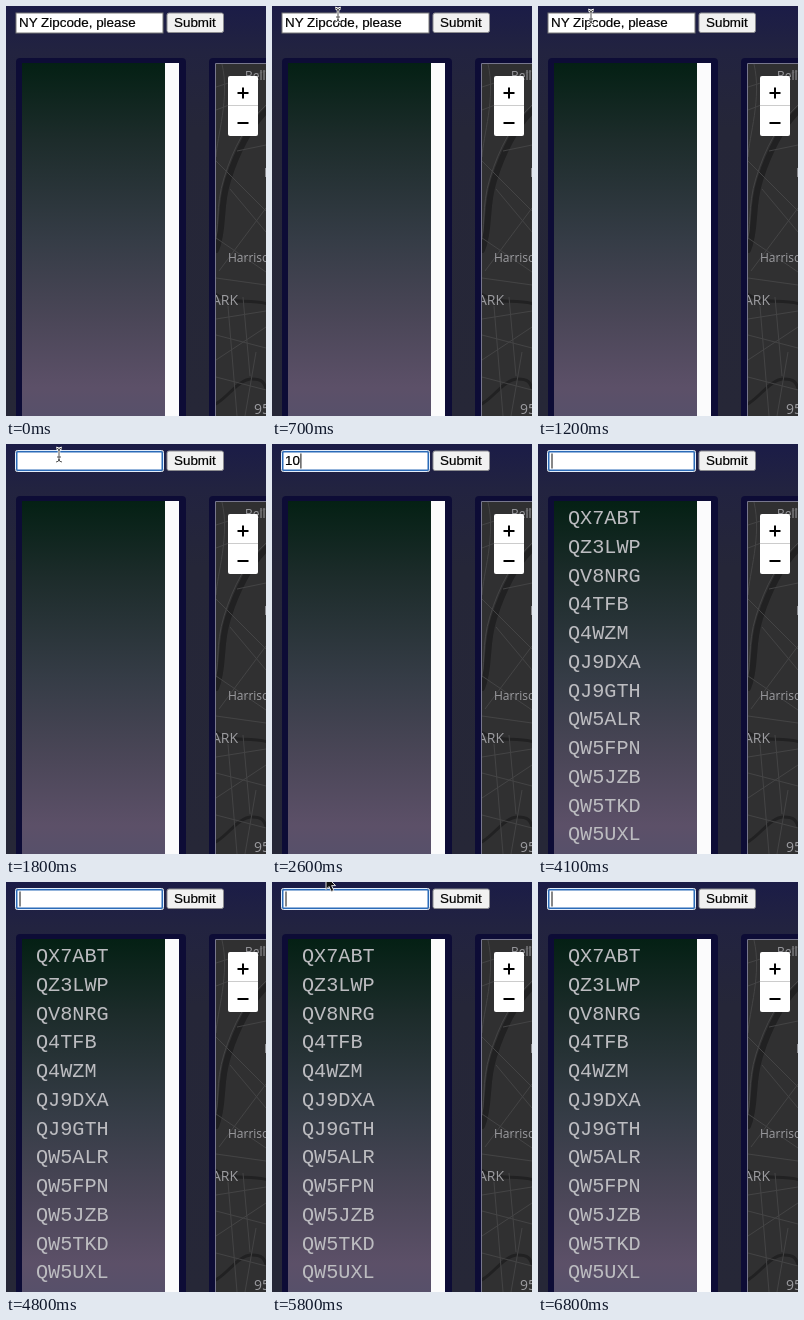
An HTML page for the animation above (7300 ms loop, 260 by 410 pixels).

```html
<!DOCTYPE html>
<html lang="en">
<head>
<meta charset="utf-8">
<title>Zipcode lookup</title>
<style>
  html, body { margin: 0; width: 100%; height: 100%; overflow: hidden; background: #242538; }
  svg { display: block; width: 260px; height: 410px; }
  .form { font: 13.4px "Liberation Sans", Arial, sans-serif; fill: #000; stroke: #000; stroke-width: .2; }
  .calls { font: 20.2px "Liberation Mono", monospace; fill: #bcbcc0; }
  .places { font: 12px "Open Sans", "Noto Sans", sans-serif; fill: #9c9ca0; }
  .places .large { font-size: 14px; }
  .roads { fill: none; stroke: #444445; stroke-width: 1; }
  .water { fill: none; stroke: #212122; stroke-linecap: round; }
</style>
</head>
<body>
<svg viewBox="0 0 260 410">
  <defs>
    <linearGradient id="page" x2="0" y2="1">
      <stop stop-color="#1b1c47"/>
      <stop offset=".11" stop-color="#222340"/>
      <stop offset=".3" stop-color="#252638"/>
      <stop offset="1" stop-color="#262737"/>
    </linearGradient>
    <linearGradient id="list" x2="0" y2="1">
      <stop stop-color="#042014"/>
      <stop offset=".22" stop-color="#1d2c2b"/>
      <stop offset=".5" stop-color="#353c46"/>
      <stop offset=".72" stop-color="#4a4657"/>
      <stop offset=".92" stop-color="#5c5068"/>
      <stop offset="1" stop-color="#57506a"/>
    </linearGradient>
    <clipPath id="mapArea"><path d="M210 58h50v352h-50z"/></clipPath>
  </defs>

  <rect width="260" height="410" fill="url(#page)"/>

  <!-- Form -->
  <rect x="10" y="7" width="147" height="20" fill="#fff" stroke="#767676"/>
  <g id="focus" fill="none">
    <rect x="9.500" y="6.500" width="148" height="21" rx="2" stroke="#e4eefa"/>
    <rect x="10.750" y="7.750" width="145.500" height="18.500" rx="1" stroke="#2b6bb8" stroke-width="1.500"/>
  </g>
  <text id="value" class="form" x="13" y="21"></text>
  <rect id="caret" y="9.500" width="1" height="15" fill="#111"/>
  <rect x="161" y="7" width="56.500" height="19.500" rx="2" fill="#f1f1f1" stroke="#8c8c90"/>
  <text class="form" x="168" y="21">Submit</text>

  <!-- Call sign list -->
  <rect x="10" y="52" width="170" height="370" rx="4" fill="#0d0c36"/>
  <rect x="16" y="57" width="143" height="353" fill="url(#list)"/>
  <rect x="159" y="57" width="14" height="353" fill="#fbfbfc"/>
  <g id="calls" class="calls"></g>

  <!-- Map -->
  <rect x="203" y="52" width="70" height="370" rx="4" fill="#0d0c36"/>
  <path d="M209.500 410V57.500H260" fill="none" stroke="#77778c"/>
  <rect x="210" y="58" width="50" height="352" fill="#303031"/>
  <g clip-path="url(#mapArea)">
    <path class="water" stroke-width="6" d="M262 103C244 120 231 146 222 174S219 222 210 244"/>
    <path class="water" stroke-width="3" d="M208 287C224 300 241 292 262 298M208 399C222 392 232 373 246 373S258 380 262 386"/>
    <path class="roads" d="M210 81L260 65M210 104L223 99M210 155L260 205M224 183L260 226M213 265L260 202M210 232L260 266M231 145L260 139M210 272L260 279M210 313L260 305M210 329L260 342M210 354L260 321M222 300L231 410M237 291L244 370M250 346L239 410M210 371L260 384"/>
    <path class="roads" stroke-width="1.500" d="M216 58C224 92 211 130 210 151M262 97C240 117 227 143 218 172S214 222 208 240"/>
    <g class="places">
      <text x="239" y="74">Belle</text>
      <text x="258" y="171">H</text>
      <text x="222" y="256">Harrison</text>
      <text class="large" x="206" y="299">ARK</text>
      <text class="large" x="248" y="408">95</text>
    </g>
  </g>
  <rect x="222" y="70" width="30" height="60" rx="2" fill="#fff"/>
  <path d="M222 99.500h30" stroke="#ccc"/>
  <path d="M231.500 87h11M237 81.500v11M231.500 117h11" stroke="#000" stroke-width="2"/>

  <!-- Pointers, with the hot spot at 0,0 -->
  <g id="beam" fill="none">
    <path d="M-3-7Q0-7 0-4Q0-7 3-7M0-4V5M-3 7Q0 7 0 4Q0 7 3 7M-2 2H2" stroke="#fff" stroke-width="2.500"/>
    <path d="M-3-7Q0-7 0-4Q0-7 3-7M0-4V5M-3 7Q0 7 0 4Q0 7 3 7M-2 2H2" stroke="#555"/>
  </g>
  <path id="arrow" d="M0 0V13.500L3 10.500L5.300 15.500L7.800 14.400L5.600 9.600H9.600Z" fill="#111" stroke="#ddd"/>
</svg>

<script>
const LOOP = 7300;
const RESULTS_AT = 4100;
const TEXT_X = 13;
const byId = id => document.getElementById(id);
const [focusRing, value, caret, calls, beam, arrow] =
  ["focus", "value", "caret", "calls", "beam", "arrow"].map(byId);

const signs = ["QX7ABT", "QZ3LWP", "QV8NRG", "Q4TFB", "Q4WZM", "QJ9DXA",
  "QJ9GTH", "QW5ALR", "QW5FPN", "QW5JZB", "QW5TKD", "QW5UXL"];

// [start ms, text, focused, caret shown]
const field = [
  [0, "NY Zipcode, please", false, false],
  [1300, "", true, true],
  [1800, "", true, false],
  [2300, "1", true, true],
  [2600, "10", true, true],
  [2900, "100", true, true],
  [3200, "1000", true, true],
  [3700, "10001", true, true],
  [3800, "", true, true],
  [4300, "", true, false],
  [4800, "", true, true],
  [5300, "", true, false],
  [5800, "", true, true],
  [6300, "", true, false],
  [6800, "", true, true]
];

// [start ms, shape, x, y]
const pointer = [
  [0, null],
  [400, arrow, 92, -9],
  [500, arrow, 83, -5],
  [600, arrow, 74, 0],
  [700, beam, 66, 9],
  [800, beam, 59, 11],
  [900, beam, 55, 12],
  [1100, beam, 54, 12],
  [1200, beam, 53, 11],
  [2300, null],
  [5200, beam, 53, 9],
  [5300, arrow, 54, -6],
  [6000, null]
];

signs.forEach((sign, i) => {
  const row = document.createElementNS("http://www.w3.org/2000/svg", "text");
  row.setAttribute("x", 30);
  row.setAttribute("y", 80 + i * 28.75);
  row.textContent = sign;
  calls.append(row);
});

const stepAt = (steps, time) => steps.findLast(([start]) => start <= time);
const show = (node, on) => node.style.display = on ? "" : "none";

function draw(time) {
  const [, text, focused, caretOn] = stepAt(field, time);
  if (value.textContent !== text) value.textContent = text;
  show(focusRing, focused);
  show(caret, caretOn);
  const width = text ? value.getComputedTextLength() : 0;
  caret.setAttribute("x", TEXT_X + width + 0.5);
  show(calls, time >= RESULTS_AT);

  const [, shape, x, y] = stepAt(pointer, time);
  for (const node of [beam, arrow]) show(node, node === shape);
  if (shape) shape.setAttribute("transform", `translate(${x} ${y})`);
}

const began = performance.now();
function tick() {
  draw((performance.now() - began) % LOOP);
  requestAnimationFrame(tick);
}
tick();
</script>
</body>
</html>
```
